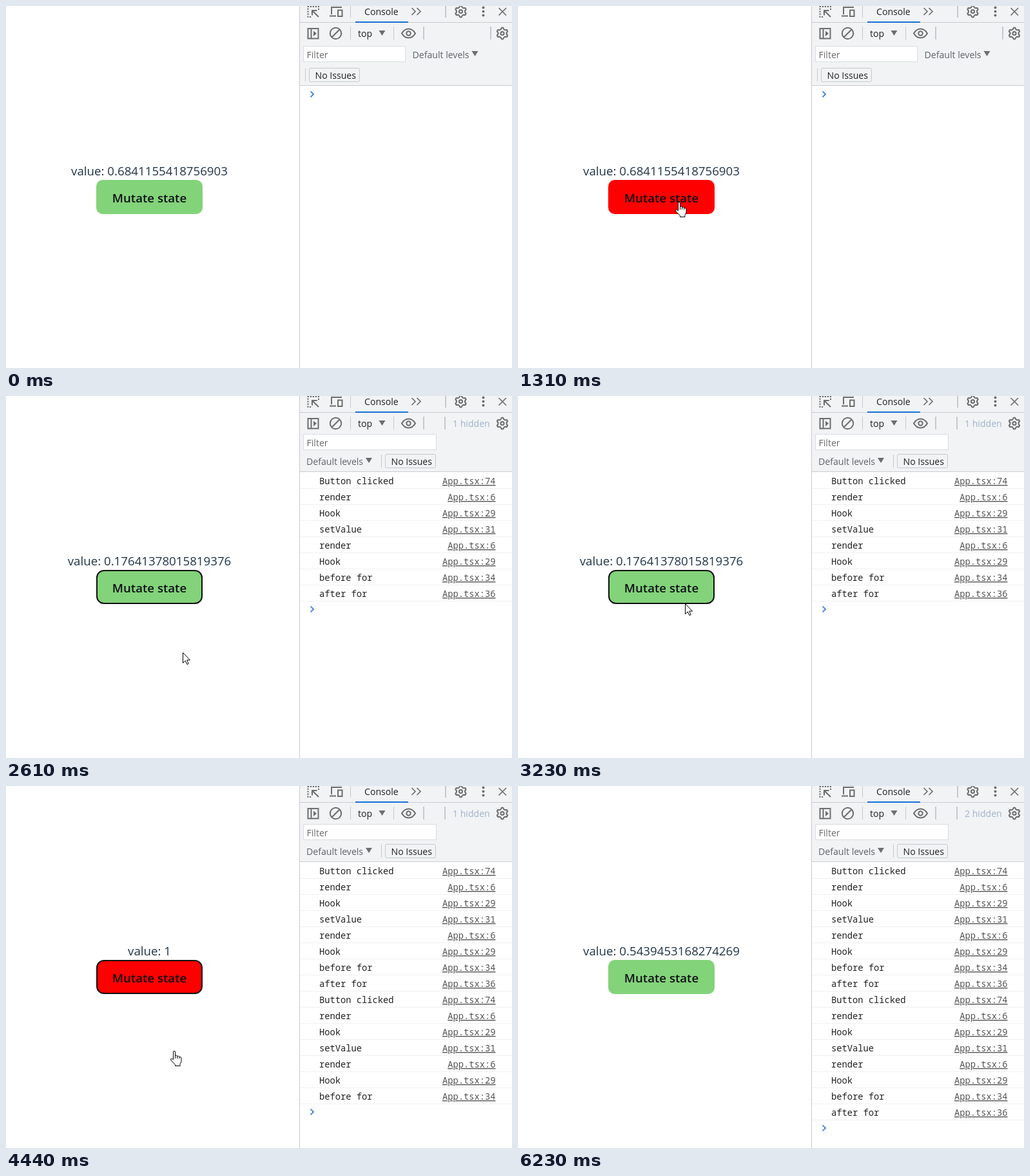
Recreate the animation shown at these times as an HTML page. Size 785 px wide and 562 px high, loop 6340 ms.

```html
<!DOCTYPE html>
<html lang="en">
<head>
<meta charset="utf-8">
<title>Mutate state</title>
<style>
  html, body { margin: 0; width: 100%; height: 100%; overflow: hidden; background: #fff; }
  svg { display: block; }
  text { font: 14.1px "Open Sans", "Noto Sans", sans-serif; fill: #202124; white-space: pre; }
  .value { font-size: 18.7px; fill: #213547; text-anchor: middle; }
  .label { font-size: 18.65px; font-weight: 600; fill: #0e1116; text-anchor: middle; }
  .grey { fill: #5f6368; }
  .hint { fill: #6b6b6b; }
  .hidden { fill: #a0b3cb; }
  .log { font: 13.75px "Noto Sans Mono", "DejaVu Sans Mono", monospace; }
  .link { fill: #545454; text-anchor: end; text-decoration: underline; }
  .icon { fill: none; stroke: #6e6e6e; stroke-width: 2; }
  .thin { stroke-width: 1.7; }
  .solid { fill: #6e6e6e; }
  .prompt { fill: none; stroke: #2a78d8; stroke-width: 1.7; }
  .cursor { fill: #fff; stroke: #000; stroke-linejoin: round; }
</style>
</head>
<body>
<svg width="785" height="562" viewBox="0 0 785 562">
  <g id="app"></g>
  <g id="tools"></g>
  <path id="cursor" class="cursor"/>
</svg>
<script>
const LOOP = 6340;
const FOCUS = 1370, BLUR = 6230;
const $ = id => document.getElementById(id);

const logs = [
  ['Button clicked', 74], ['render', 6], ['Hook', 29], ['setValue', 31],
  ['render', 6], ['Hook', 29], ['before for', 34], ['after for', 36]
];
const values = ['0.6841155418756903', '0.17641378015819376', '0.5439453168274269'];

// The page freezes from click to done; hover colour and pointer shape catch up later.
const cycles = [
  { enter: 780, click: 1430, done: 2210, cool: 2330, arrow: 2610 },
  { enter: 3250, click: 3790, done: 4810, cool: 4840, arrow: 4840 }
];

const smooth = p => p * p * (3 - 2 * p);
const slowDown = p => 1 - (1 - p) ** 1.5;
const speedUp = p => p ** 1.5;

// Each move goes on from where the last one ended; bow bends the path downwards.
const start = [642, 556];
const moves = [
  { from: 140, to: 780, end: [267, 321], ease: slowDown, bow: 35 },
  { from: 780, to: 1370, end: [250, 304], ease: smooth },
  { from: 1430, to: 1650, end: [274, 398], ease: smooth },
  { from: 2610, to: 3250, end: [259, 322], ease: smooth },
  { from: 3250, to: 3650, end: [248, 306], ease: smooth },
  { from: 3800, to: 4440, end: [261, 411], ease: smooth },
  { from: 5190, to: 5790, end: [656, 564], ease: speedUp }
];

const ARROW = 'M.5 .5V16.5L4.2 13L6.9 18.6L9.2 17.6L6.7 12H11.5Z';
const HAND = 'M-1.5 14V2Q-1.5 .5 0 .5T1.5 2V7.5Q4 6.3 4.5 8.5Q7 7.3 7.7 9.5' +
  'Q10.8 9 11 11.5V15.5Q11 18 9 20.5V23.5H1.5V21.5L-5 15Q-6.2 12.6-4.5 12' +
  'Q-3 11.8-1.5 14M1.5 7.5V12M4.5 8.5V12M7.7 9.5V12.5';

const text = (x, y, s, cls = '') => `<text x="${x}" y="${y}" class="${cls}">${s}</text>`;
const rect = (x, y, w, h, fill, extra = '') =>
  `<rect x="${x}" y="${y}" width="${w}" height="${h}" fill="${fill}" ${extra}/>`;
const icon = (d, cls = '', extra = '') => `<path class="icon ${cls}" d="${d}" ${extra}/>`;
const ring = (x, y, r) => `<circle class="icon" cx="${x}" cy="${y}" r="${r}"/>`;
const dot = (x, y) => `<circle class="solid" cx="${x}" cy="${y}" r="2"/>`;
const down = (x, y) => `<path class="solid" d="M${x} ${y}h10l-5 8z"/>`;
const bar = (x, y, h = 20, w = 1) => rect(x, y, w, h, '#c6c9cd');
const between = (t, a, b) => t >= a && t < b;

function gear(x, y) {
  const points = Array.from({ length: 24 }, (_, i) => {
    const r = i % 4 < 2 ? 8.8 : 6.6;
    const a = (i + 5.5) * Math.PI / 12;
    return `${x + r * Math.cos(a)} ${y + r * Math.sin(a)}`;
  });
  return icon(`M${points.join('L')}Z`) + ring(x, y, 2.6);
}

const toolbar =
  // tab row
  icon('M485 6V1H468.5V17H474', '', 'stroke-dasharray="2.2 1.8"') +
  icon('M475 14.5V7H482.5M475.5 7.5L485 17') +
  icon('M505 13V2H521M502 15.5H512M515 6.5H521.5V16H515Z') +
  bar(534, 0, 18) + text(556, 14, 'Console') +
  rect(456, 25, 329, 1, '#cacdd1') + rect(542, 24, 82, 2, '#1a6fd4') +
  icon('M629.5 3l5.5 5.5l-5.5 5.5M637.5 3l5.5 5.5l-5.5 5.5', 'thin') +
  bar(681, 0, 18, 2) + gear(705.5, 8.5) +
  [2.5, 8.5, 14.5].map(y => dot(740.5, y)).join('') +
  icon('M764.5 3l11.5 11.5M776 3l-11.5 11.5', 'thin') +
  // action row
  icon('M468.5 35H484.5V50.5H468.5ZM473.5 35V50.5') +
  '<path class="solid" d="M477 38.5v8.5l5-4.2z"/>' +
  ring(511.5, 42.5, 8.7) + icon('M505.5 48.5l12-12') +
  bar(534, 32) + text(546, 48, 'top') + down(578.5, 38) + bar(601, 32) +
  icon('M614 42.5Q618 35.5 624.5 35.5T635 42.5Q631 49.5 624.5 49.5T614 42.5Z') +
  ring(624.5, 42.5, 3.2) + bar(647, 32, 20, 2) + gear(770, 42.5);

function tools(count, hidden) {
  const wide = !hidden;
  const top = wide ? 124 : 118;
  const [levelX, levelY] = wide ? [630.5, 81] : [466, 107];
  const [issueX, issueY] = wide ? [470, 96] : [588, 90];
  const promptY = top + 13 + count * 25;

  const rows = Array.from({ length: count }, (_, i) => {
    const [message, line] = logs[i % logs.length];
    const y = top + i * 25;
    return text(486, y + 19, message, 'log') + text(759.5, y + 19, 'App.tsx:' + line, 'log link') +
      rect(456, y + 25, 329, 1, '#f0f0f0');
  });

  return rect(456, 0, 329, top, '#f1f3f4') + rect(456, top - 1, 329, 1, '#cacdd1') +
    rect(455, 0, 1, 562, '#c6c9cd') + toolbar +
    (wide ? bar(751, 32, 20, 2) : bar(680, 32, 20, 2) + text(693, 48, hidden + ' hidden', 'hidden')) +
    rect(461.5, top - 61.5 + (wide ? 0 : 3), wide ? 158 : 206, 24, '#fff', 'stroke="#d9dce0"') +
    text(466.5, wide ? 81 : 78, 'Filter', 'hint') +
    text(levelX, levelY, 'Default levels', 'grey') + down(levelX + 92, levelY - 11) +
    bar(issueX - 6, issueY + 1) +
    rect(issueX + .5, issueY + .5, 78, 21, '#f1f3f4', 'rx="2" stroke="#c6c9cd"') +
    text(issueX + 9.5, issueY + 17, 'No Issues') + rows.join('') +
    `<path class="prompt" d="M472.5 ${promptY - 4.5}l4.5 4.5l-4.5 4.5"/>`;
}

function app(value, red, focus) {
  const fill = red ? '#f00' : '#83d37a';
  return text(222.5, 263, 'value: ' + value, 'value') +
    (focus ? rect(141, 271, 163, 51, fill, 'rx="11" stroke="#101010" stroke-width="2"')
           : rect(140, 270, 165, 53, fill, 'rx="10"')) +
    text(222.5, 305, 'Mutate state', 'label');
}

function pointer(t) {
  let [x, y] = start;
  for (const { from, to, end, ease, bow = 0 } of moves) {
    if (t < from) break;
    const p = ease(Math.min(1, (t - from) / (to - from)));
    x += (end[0] - x) * p;
    y += (end[1] - y) * p + bow * Math.sin(Math.PI * p);
  }
  return [x, y].map(Math.round);
}

const shown = {};
function show(id, html) {
  if (shown[id] !== html) $(id).innerHTML = shown[id] = html;
}

function frame() {
  const t = performance.now() % LOOP;
  const finished = cycles.filter(c => t >= c.done).length;
  const busy = cycles.some(c => between(t, c.click, c.done));
  const red = cycles.some(c => between(t, c.enter, c.cool));
  const hand = cycles.some(c => between(t, c.enter, c.arrow));

  show('app', app(busy ? 1 : values[finished], red, between(t, FOCUS, BLUR)));
  show('tools', tools(finished * logs.length + (busy ? logs.length - 1 : 0), finished));

  const cursor = $('cursor');
  const visible = between(t, moves[0].from, moves.at(-1).to);
  cursor.setAttribute('visibility', visible ? 'visible' : 'hidden');
  cursor.setAttribute('d', hand ? HAND : ARROW);
  cursor.setAttribute('transform', `translate(${pointer(t)})`);
  requestAnimationFrame(frame);
}
frame();
</script>
</body>
</html>
```
